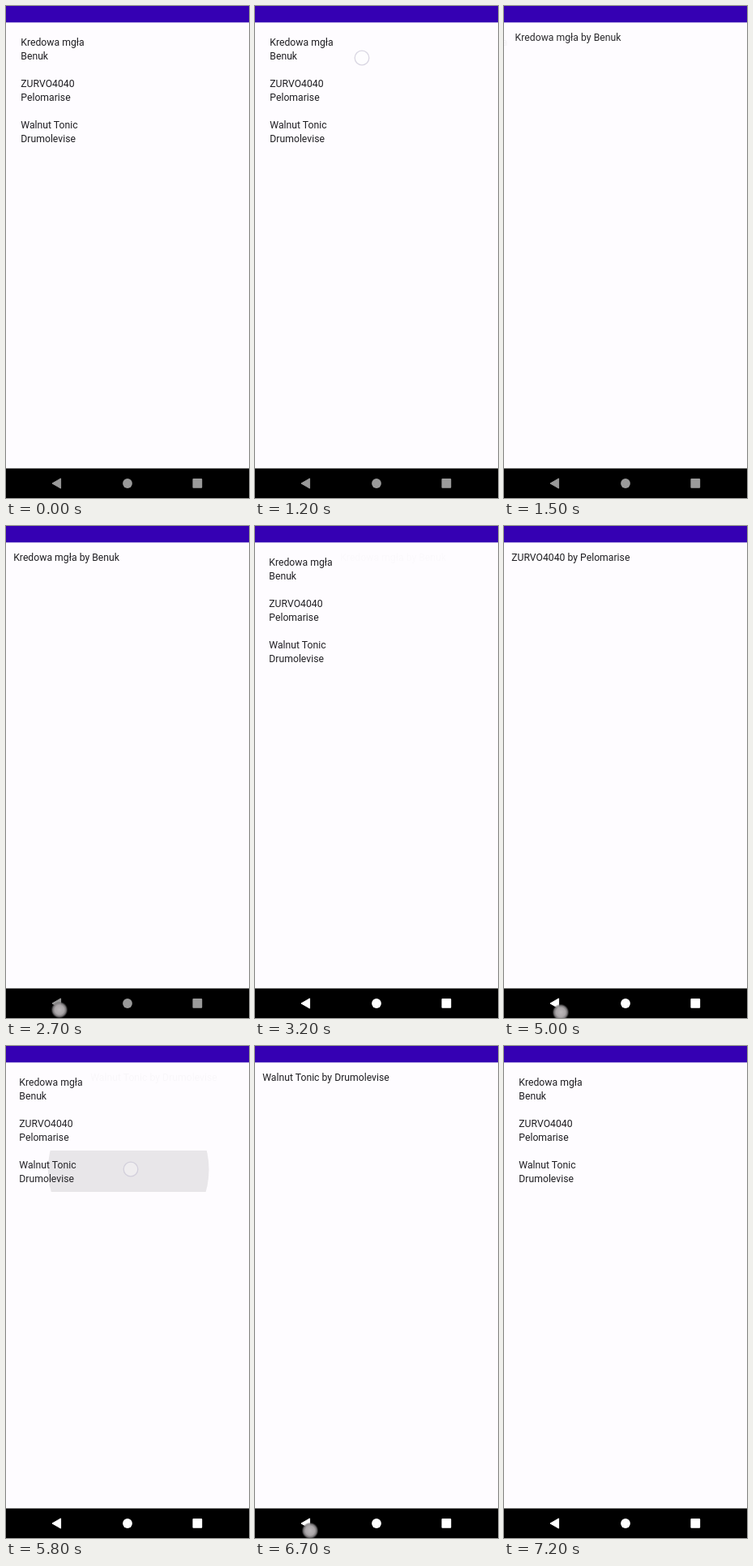
Recreate the animation shown at these times as an HTML page. Size 300 px wide and 607 px high, loop 7700 ms.

```html
<!DOCTYPE html>
<html lang="pl">
<head>
<meta charset="utf-8">
<title>Song list</title>
<style>
  html, body { margin: 0; width: 100%; height: 100%; overflow: hidden; background: #fefcff; }
  svg { display: block; width: 100%; height: 100%; }
  text { font: 12.22px Roboto, sans-serif; fill: #1f1e22; }
</style>
</head>
<body>
<svg viewBox="0 0 300 607">
  <defs>
    <clipPath id="rowClip"><rect id="rowBox" width="300" height="51"/></clipPath>
    <radialGradient id="glow">
      <stop offset="0" stop-color="#bcb8ba"/>
      <stop offset=".55" stop-color="#aaa6a8"/>
      <stop offset=".78" stop-color="#858284" stop-opacity=".9"/>
      <stop offset="1" stop-color="#555" stop-opacity="0"/>
    </radialGradient>
  </defs>
  <rect width="300" height="607" fill="#fefcff"/>
  <g id="list">
    <g clip-path="url(#rowClip)"><circle id="ripple"/></g>
  </g>
  <text id="detail" x="9.2" y="43"/>
  <rect width="300" height="20.3" fill="#3500b3"/>
  <rect y="570.5" width="300" height="36.5"/>
  <g id="nav">
    <path d="M57 589L67.6 582.9V595.1Z" stroke-width="1" stroke-linejoin="round"/>
    <circle cx="150" cy="589" r="5.9"/>
    <rect x="230.4" y="583" width="11.8" height="11.8" rx="1"/>
  </g>
  <circle id="press" r="8.8" fill="#fff" fill-opacity=".3" stroke="#c4c2d2" stroke-opacity=".65" stroke-width="1.3"/>
  <circle id="backPress" r="10.5" fill="url(#glow)"/>
</svg>
<script>
const LOOP = 7700, STEP = 100, SHIFT = 97, ROW_TOP = 27, ROW_H = 51;

const songs = [
  ['Kredowa mgła', 'Benuk'],
  ['ZURVO4040', 'Pelomarise'],
  ['Walnut Tonic', 'Drumolevise']
];

// touch: [from, to, x, y]; slide and ripple are start times in ms
const opens = [
  { touch: [1200, 1400, 132, 64], ripple: 1184, slide: 1257 },
  { touch: [3900, 4100, 118, 105], ripple: 3884, slide: 3960 },
  { touch: [5800, 5900, 154, 152], ripple: 5755, slide: 5789 }
];
const backs = [
  { touch: [2700, 2900, 66, 597], slide: 2870 },
  { touch: [5000, 5200, 70, 600], slide: 5170 },
  { touch: [6700, 6800, 68, 598], slide: 6775 }
];

const $ = id => document.getElementById(id);
const set = (el, attrs) => { for (const k in attrs) el.setAttribute(k, attrs[k]); };
const clamp = v => Math.max(0, Math.min(1, v));
const mix = (a, b, k) => a + (b - a) * k;

songs.forEach((song, row) => song.forEach((label, line) => {
  const el = document.createElementNS('http://www.w3.org/2000/svg', 'text');
  set(el, { x: 18.3, y: 49 + row * ROW_H + line * 16.5 });
  el.textContent = label;
  $('list').append(el);
}));

// Critically damped spring
function spring(ms) {
  if (ms <= 0) return 0;
  const w = ms * 0.02;
  const p = 1 - (1 + w) * Math.exp(-w);
  return p > 0.993 ? 1 : p;
}

// cubic-bezier(.4, 0, .2, 1)
function fastOutSlowIn(x) {
  let lo = 0, hi = 1;
  for (let i = 0; i < 20; i++) {
    const u = (lo + hi) / 2, v = 1 - u;
    if (1.2 * v * v * u + 0.6 * v * u * u + u * u * u < x) lo = u; else hi = u;
  }
  return 3 * (1 - lo) * lo * lo + lo ** 3;
}

function drawRipple(t, row) {
  const { touch, ripple } = opens[row];
  const age = t - ripple;
  const k = clamp(age / 225);
  const top = ROW_TOP + row * ROW_H;
  const alpha = age > 20 ? clamp(age / 60) * (1 - clamp((age - 225) / 150)) : 0;
  set($('rowBox'), { y: top });
  set($('ripple'), {
    cx: mix(touch[2], 150, k),
    cy: mix(touch[3], top + ROW_H / 2, k),
    r: mix(90, 160, fastOutSlowIn(k)),
    opacity: 0.12 * alpha
  });
}

function drawTouch(el, t, events) {
  const hit = events.find(({ touch }) => t >= touch[0] && t < touch[1]);
  el.style.display = hit ? '' : 'none';
  if (hit) set(el, { cx: hit.touch[2], cy: hit.touch[3] });
}

function draw(t) {
  let row = 0, open = 0;
  opens.forEach((o, i) => {
    if (t >= o.touch[0]) row = i;
    open += spring(t - o.slide) - spring(t - backs[i].slide);
  });
  open = clamp(open);

  set($('list'), { transform: `translate(${-SHIFT * open})`, opacity: 1 - open });
  set($('detail'), { transform: `translate(${SHIFT * (1 - open)})`, opacity: open });
  $('detail').textContent = songs[row].join(' by ');
  drawRipple(t, row);

  const lit = Math.round(mix(154, 255, clamp((t - 2700) / 200)));
  const tone = `rgb(${lit},${lit},${lit})`;
  set($('nav'), { fill: tone, stroke: tone, 'stroke-width': 0 });
  drawTouch($('press'), t, opens);
  drawTouch($('backPress'), t, backs);
}

const start = performance.now();
function tick() {
  const t = (performance.now() - start) % LOOP;
  draw(Math.floor(t / STEP) * STEP);
  requestAnimationFrame(tick);
}
tick();
</script>
</body>
</html>
```
